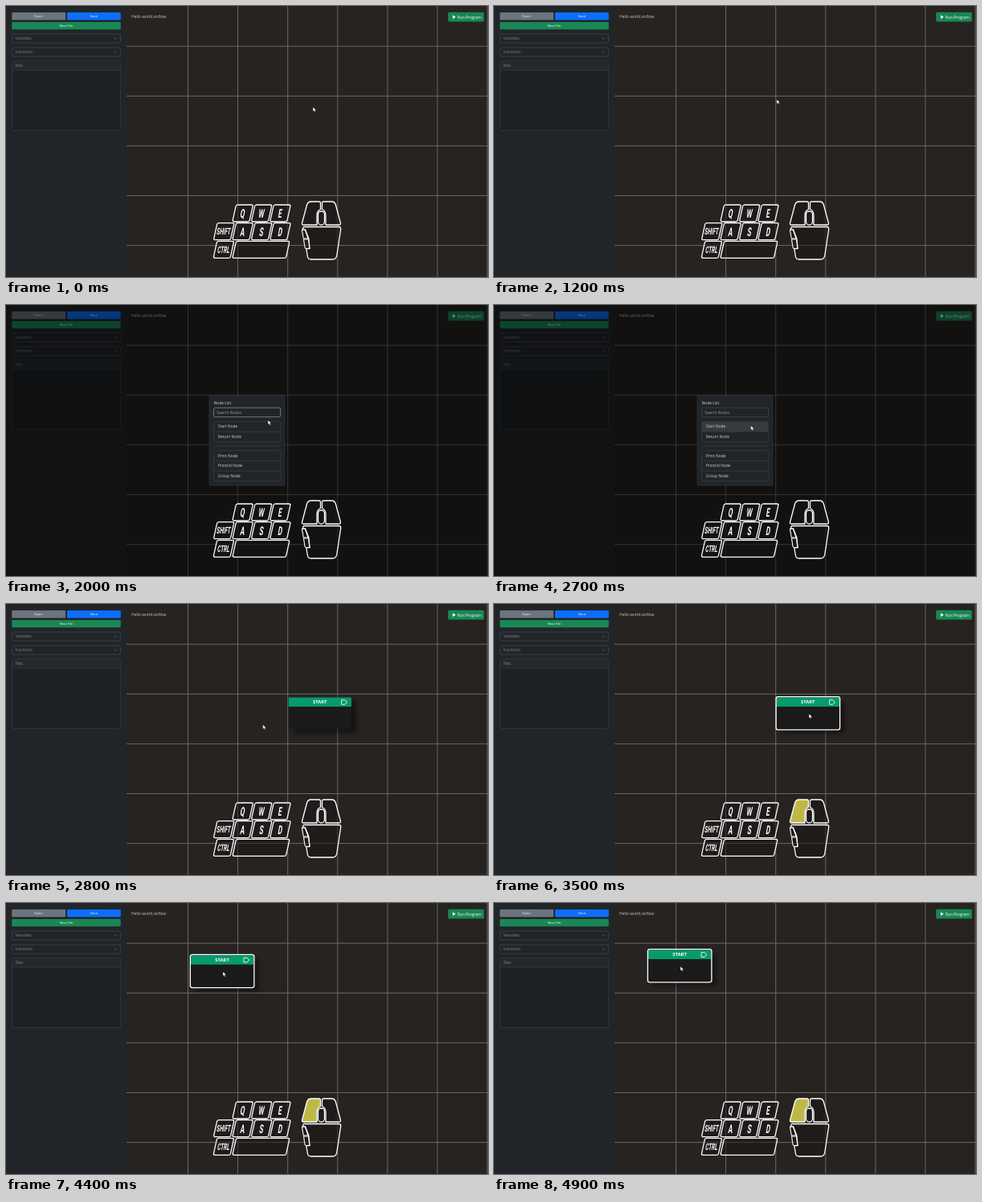
These frames come from a looping animation (600 px wide and 338 px high, 5000 ms). An HTML page with a canvas:

```html
<!DOCTYPE html>
<html lang="en">
<head>
<meta charset="utf-8">
<title>Node editor</title>
<style>
html, body { margin: 0; width: 100%; height: 100%; overflow: hidden; background: #272321; }
canvas { display: block; width: 600px; height: 338px; }
</style>
</head>
<body>
<canvas id="stage"></canvas>
<script>
const W = 600, H = 338, LOOP = 5000, STEP = 100;
const SANS = '"Open Sans", "Noto Sans", sans-serif';
const canvas = document.getElementById('stage');
const dpr = window.devicePixelRatio || 1;
canvas.width = W * dpr;
canvas.height = H * dpr;
const ctx = canvas.getContext('2d');

// Keyframes: [time, x, y]
const cursorPath = [
  [600, 382, 126], [1000, 351.8, 116.5],
  [1600, 351.8, 116.5], [2100, 319.7, 150.5],
  [2800, 319.7, 150.5], [3100, 350, 146], [3500, 392, 137]
];
const dragPath = [
  [3600, 351.7, 116.5], [3800, 327, 107], [4000, 276, 90],
  [4150, 252, 76], [4300, 239, 67], [4600, 212, 61.5], [4900, 192, 58.5]
];
const GRAB = [40, 20.5];

function at(path, t) {
  if (t <= path[0][0]) return path[0].slice(1);
  for (let i = 1; i < path.length; i++) {
    const [t0, x0, y0] = path[i - 1], [t1, x1, y1] = path[i];
    if (t <= t1) {
      const k = (t - t0) / (t1 - t0);
      return [x0 + (x1 - x0) * k, y0 + (y1 - y0) * k];
    }
  }
  return path[path.length - 1].slice(1);
}

function box(x, y, w, h, r, fill, line, lw = 0.6) {
  ctx.beginPath();
  ctx.roundRect(x, y, w, h, r);
  paint(fill, line, lw);
}

function paint(fill, line, lw) {
  if (fill) { ctx.fillStyle = fill; ctx.fill(); }
  if (line) { ctx.strokeStyle = line; ctx.lineWidth = lw; ctx.stroke(); }
}

function shape(d, fill, line, lw = 1.3) {
  const p = new Path2D(d);
  if (fill) { ctx.fillStyle = fill; ctx.fill(p); }
  if (line) { ctx.strokeStyle = line; ctx.lineWidth = lw; ctx.stroke(p); }
}

function label(s, x, y, size, color, align = 'left', weight = 400) {
  ctx.font = `${weight} ${size}px ${SANS}`;
  ctx.textAlign = align;
  ctx.textBaseline = 'alphabetic';
  ctx.fillStyle = color;
  ctx.fillText(s, x, y + size * 0.36);
}

function drawGrid() {
  ctx.fillStyle = '#272321';
  ctx.fillRect(0, 0, W, H);
  ctx.fillStyle = '#6b6866';
  for (let i = 0; i < 7; i++) ctx.fillRect(226 + i * 62.1, 0, 1, H);
  for (let i = 0; i < 5; i++) ctx.fillRect(150, 49.7 + i * 62.1, 450, 1);
}

function drawPicker(name, y) {
  box(7.6, y, 134.8, 11, 1.6, '#212529', '#495057');
  label(name, 11.5, y + 5.6, 4.75, '#7f858a');
  shape(`M134.5 ${y + 4.8} l1.6 1.5 l1.6 -1.5`, null, '#737a80', 0.6);
}

function drawPanel() {
  ctx.fillStyle = '#212529';
  ctx.fillRect(0, 0, 150, H);
  box(7.3, 8, 66.8, 9.5, 1.3, '#6c757d');
  box(76, 8, 66.8, 9.5, 1.3, '#0d6efd');
  box(7.3, 20, 135.5, 9.3, 1.3, '#198754');
  label('Open', 40.6, 12.7, 4.3, '#f4f5f6', 'center');
  label('Save', 109.4, 12.7, 4.3, '#fff', 'center');
  label('New File', 75, 24.7, 4.25, '#fff', 'center');
  drawPicker('Variables', 35);
  drawPicker('Functions', 52);
  box(7.6, 68.6, 134.8, 86.7, 1.6, '#1d2125', '#3d4348');
  ctx.fillStyle = '#24282c';
  ctx.fillRect(8, 69, 134, 11);
  ctx.fillStyle = '#3d4348';
  ctx.fillRect(7.6, 79.8, 134.8, 0.6);
  label('Files', 11.5, 74.4, 4.75, '#7f858a');
}

function drawTopBar() {
  label('Hello world.visflow', 156, 13.7, 4.95, '#c9c8c7');
  box(550.2, 7.8, 44.9, 11.8, 1.6, '#198754');
  shape('M556 11.3 L559.8 13.7 L556 16.1 Z', '#fff');
  label('Run Program', 562, 13.8, 4.85, '#fff');
}

function drawNode(x, y, selected) {
  ctx.save();
  ctx.shadowColor = 'rgba(0,0,0,.42)';
  ctx.shadowBlur = 5 * dpr;
  ctx.shadowOffsetX = 6.5 * dpr;
  ctx.shadowOffsetY = 5.5 * dpr;
  box(x, y, 78.2, 39.3, 1.8, selected ? '#1a1a1b' : '#1c1b1b');
  ctx.restore();
  box(x, y, 78.2, 11.6, [1.8, 1.8, 0, 0], '#079b6b');
  label('START', x + 39, y + 5.8, 5.9, '#fff', 'center', 700);
  shape(`M${x + 66} ${y + 3.2} h4 l3 2.8 l-3 2.8 h-4 Z`, null, '#eafff7', 0.9);
  if (selected) box(x - 0.6, y - 0.8, 79.5, 41.2, 2.4, null, '#fff', 1.3);
}

function drawRows(names, y, hover) {
  const h = 12.7, bottom = names.length * h;
  box(258.6, y, 83, bottom, 1.6, '#212529', '#3f454a');
  names.forEach((name, i) => {
    const top = y + i * h;
    if (name === hover) box(258.9, top + 0.3, 82.4, h - 0.6, 1.4, '#373b3f');
    if (i) {
      ctx.fillStyle = '#3f454a';
      ctx.fillRect(258.6, top - 0.3, 83, 0.6);
    }
    label(name, 264, top + h / 2, 4.85, '#cfd2d5');
  });
}

function drawDialog(t) {
  const focused = t < 2600;
  const caret = focused && (t - 1300) % 1000 < 500;
  ctx.fillStyle = 'rgba(0,0,0,.5)';
  ctx.fillRect(0, 0, W, H);
  box(253, 113, 94, 112, 2, '#212529', '#343a3e');
  label('Node List', 258.5, 122, 4.95, '#d8dbdd');
  box(258.6, 128.2, 83, 11.4, 1.6, '#212529', focused ? '#78818a' : '#495057', focused ? 0.9 : 0.6);
  label('Search Nodes', 262.3, 134, 4.85, '#90979d');
  if (caret) {
    ctx.fillStyle = '#e6e8ea';
    ctx.fillRect(262, 131.2, 0.6, 6);
  }
  drawRows(['Start Node', 'Return Node'], 145.4, t >= 2100 ? 'Start Node' : '');
  ctx.fillStyle = '#3a4045';
  ctx.fillRect(258.6, 175.8, 83, 0.6);
  drawRows(['Print Node', 'PrintLN Node', 'Group Node'], 181.6);
}

const KEY_FILL = 'rgba(22,20,19,.5)';

function drawKey(text, x, y, w = 21, size = 15) {
  const h = 21, slant = 0.22;
  ctx.save();
  ctx.transform(1, 0, -slant, 1, x, y);
  box(0, 0, w, h, 2, KEY_FILL, '#fff', 1.3);
  ctx.restore();
  if (!text) return;
  // Condensed oblique lettering shared by all keys
  ctx.save();
  ctx.transform(0.54, 0, -0.16, 1, x + w / 2 - slant * h / 2, y + h / 2);
  ctx.font = `700 ${size}px Roboto, "Liberation Sans", sans-serif`;
  ctx.textAlign = 'center';
  ctx.textBaseline = 'alphabetic';
  ctx.fillStyle = '#fff';
  ctx.fillText(text, 0, size * 0.36);
  ctx.restore();
}

function drawKeys() {
  const cols = [286.5, 310, 333.3], rows = [248, 270.7, 293.4];
  ['QWE', 'ASD'].forEach((line, r) => {
    [...line].forEach((ch, c) => drawKey(ch, cols[c], rows[r]));
  });
  drawKey('SHIFT', 263, rows[1], 21, 11.5);
  drawKey('CTRL', 262.7, rows[2], 21, 11.5);
  drawKey('', cols[0], rows[2], 66.5);
}

function drawMouse(pressed) {
  const button = 'M374.6 248 Q376 244 379.5 244 H389.5 Q391.5 244 391.5 246 V253.5 Q387 255.5 387 261 V273 H370.5 Q368 273 368.6 270.5 Z';
  shape(button, pressed ? '#beb946' : KEY_FILL, '#fff');
  ctx.save();
  ctx.transform(-1, 0, 0, 1, 785, 0);
  shape(button, KEY_FILL, '#fff');
  ctx.restore();
  box(388.5, 256, 8, 17, 4, KEY_FILL, '#fff', 1.3);
  shape('M370.5 275.5 H414.5 Q417 275.5 416.7 278.5 L411.8 311 Q411 316 406.5 316 H379.5 Q376 316 375.3 312 L373.8 302.5 L378 302.5 L376.8 290 L372.5 279 L369 279 Z', KEY_FILL, '#fff');
  shape('M369.5 279 H372.3 L376 289.7 L370.3 290 L368.6 280.2 Q368.4 279 369.5 279 Z', KEY_FILL, '#fff', 1.1);
  shape('M370.5 291 L376.5 291 L377.9 302.5 H373.8 Q372.3 302.5 372 301 Z', KEY_FILL, '#fff', 1.1);
}

function drawCursor(x, y) {
  shape(`M${x} ${y} v5.4 l1.3 -1.1 l1 2 l1 -.5 l-.9 -1.9 h1.8 Z`, '#fff', '#111', 0.35);
}

function draw(t) {
  ctx.setTransform(dpr, 0, 0, dpr, 0, 0);
  const dragging = t >= 3500;
  const node = at(dragPath, t);
  const cursor = t > 3600 ? [node[0] + GRAB[0], node[1] + GRAB[1]] : at(cursorPath, t);
  drawGrid();
  drawPanel();
  drawTopBar();
  if (t >= 2800) drawNode(node[0], node[1], dragging);
  if (t >= 1300 && t < 2800) drawDialog(t);
  ctx.lineJoin = 'round';
  drawKeys();
  drawMouse(dragging || t === 2600);
  drawCursor(cursor[0], cursor[1]);
}

function tick() {
  draw(Math.floor((performance.now() % LOOP) / STEP) * STEP);
  requestAnimationFrame(tick);
}
tick();
</script>
</body>
</html>
```
